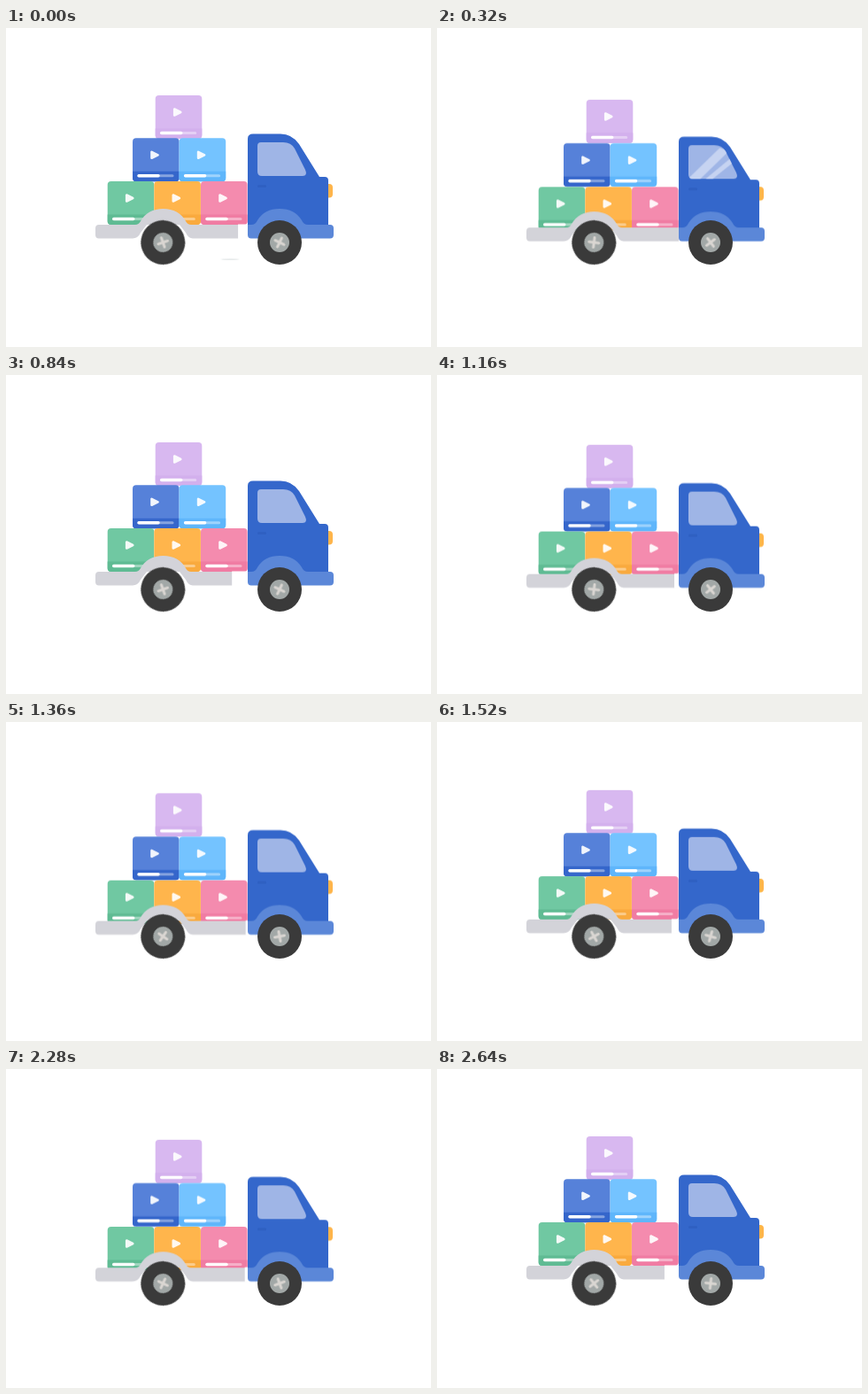
These frames come from a looping animation (480x360 px, 2680 ms). An HTML page:

```html
<!DOCTYPE html>
<html lang="en">
<head>
<meta charset="utf-8">
<title>Delivery truck</title>
<style>
  html, body { margin: 0; width: 100%; height: 100%; overflow: hidden; background: #fff; }
  svg { display: block; width: 100vw; height: 100vh; }

  /* Three bumps and four wheel turns make one 2680 ms loop. */
  .row, .body, .edge, .glare, .streak { animation: 893.333ms ease-in-out infinite; }
  .row { animation-name: cargo; }
  .body { animation-name: bump; }
  .edge { animation-name: edge; animation-timing-function: linear; }
  .glare { animation-name: glare; animation-timing-function: linear; }
  .streak { animation-name: streak; transform-origin: 253px 261px; }
  .spin { animation: spin 670ms linear infinite; }

  @keyframes cargo {
    0%, 19.5%, 82%, 100% { transform: translateY(0); }
    40% { transform: translateY(calc(var(--k) * 6.3px)); }
  }
  @keyframes bump {
    0%, 16%, 88%, 100% { transform: translateY(0); }
    36% { transform: translateY(3.2px); }
  }
  @keyframes edge {
    0% { transform: translateX(-11px); }
    19% { transform: translateX(-2px); }
    30% { transform: translateX(-5px); }
    36%, 45% { transform: translateX(0); }
    70% { transform: translateX(-8px); }
    94% { transform: translateX(-18px); }
    100% { transform: translateX(-11px); }
  }
  @keyframes glare {
    0%, 31% { transform: translateX(-6px); opacity: 0; }
    35% { transform: translateX(-1px); opacity: 1; }
    37% { transform: translateX(2px); opacity: 1; }
    50%, 100% { transform: translateX(70px); opacity: 0; }
  }
  @keyframes streak {
    0% { transform: scale(.4, .35); opacity: .8; }
    19% { transform: scale(1); opacity: 1; }
    26%, 95% { transform: scale(1, .4); opacity: 0; }
    96% { transform: scale(.2, .3); opacity: 0; }
    100% { transform: scale(.4, .35); opacity: .8; }
  }
  @keyframes spin {
    from { transform: rotate(8deg); }
    to { transform: rotate(368deg); }
  }
</style>
</head>
<body>
<svg viewBox="0 0 480 360">
  <defs>
    <clipPath id="pane">
      <path id="glass" d="M288 129H313Q322 129 326 136L338 160Q341 167 335 167H289Q284 167 284 162V133Q284 129 288 129Z"/>
    </clipPath>
    <g id="card">
      <rect width="52.6" height="49" rx="4" style="fill:var(--c)"/>
      <path d="M0 37.5H52.6V45Q52.6 49 48.6 49H4Q0 49 0 45Z" style="fill:var(--d)"/>
      <path d="M21.5 15.5V22.5L28.5 19Z" fill="#fff" stroke="#fff" stroke-width="2.6" stroke-linejoin="round" opacity=".92"/>
      <path d="M7 42.5H45" stroke="#fff" stroke-width="3" stroke-linecap="round" opacity=".4"/>
      <path d="M7 42.5H29" stroke="#fff" stroke-width="3.4" stroke-linecap="round"/>
    </g>
    <g id="wheel">
      <circle r="25" fill="#3a3a3a"/>
      <circle r="11" fill="#a2a8a7"/>
      <path class="spin" d="M-5.5 0H5.5M0-5.5V5.5" stroke="#dad6d2" stroke-width="3" stroke-linecap="round"/>
    </g>
  </defs>

  <ellipse class="streak" cx="253" cy="261" rx="27" ry="2.6" fill="#e2e6e7"/>

  <g class="row" style="--k:.85">
    <use href="#card" x="168.7" y="76" style="--c:#d8b8f0;--d:#d3b0ed"/>
  </g>
  <g class="row" style="--k:1">
    <use href="#card" x="143" y="124.3" style="--c:#5681d9;--d:#3566cb"/>
    <use href="#card" x="195.6" y="124.3" style="--c:#74c3ff;--d:#5fb6fb"/>
  </g>
  <g class="row" style="--k:1.1">
    <use href="#card" x="114.7" y="173" style="--c:#70c8a2;--d:#5fbb93"/>
    <use href="#card" x="167.3" y="173" style="--c:#ffb54c;--d:#f9aa3e"/>
    <use href="#card" x="220" y="173" style="--c:#f48bae;--d:#f07ca3"/>
  </g>

  <g class="body">
    <path fill="#d3d3d9" d="M105 222H146Q150 222 152 218Q160 204 177.500 204T203 218Q205 222 209 222H273V237.500H211Q206 237.500 203 231L196 222H159L152 231Q149 237.500 143 237.500H105Q101 237.500 101 233.500V226Q101 222 105 222Z"/>
    <rect class="edge" x="273" y="221.500" width="20" height="17" fill="#fff"/>
    <rect x="359" y="176" width="10" height="15.500" rx="4" fill="#ffb54a"/>
    <path fill="#3467cb" d="M273 125Q273 119.500 279 119.500H310Q323 119.500 331 131L354 168H360Q364 168 364 172V224H273Z"/>
    <use href="#glass" fill="#9fb5e6"/>
    <g clip-path="url(#pane)">
      <path class="glare" fill="#c6d3f1" d="M283 167L319 132L329 136L297 167ZM303 167L332 143L336 147L311 167Z"/>
    </g>
    <rect x="284" y="177" width="10" height="3" rx="1.500" fill="#2f60c2"/>
    <path fill="#5b87d8" d="M273 222H277Q282 222 284 217Q292 204 309 204T334 217Q336 222 341 222H366Q370 222 370 226V233.500Q370 237.500 366 237.500H277Q273 237.500 273 233.500Z"/>
  </g>

  <g transform="translate(177.300 242)"><g transform="rotate(45)"><use href="#wheel"/></g></g>
  <g transform="translate(309 242)"><use href="#wheel"/></g>
</svg>
</body>
</html>
```
